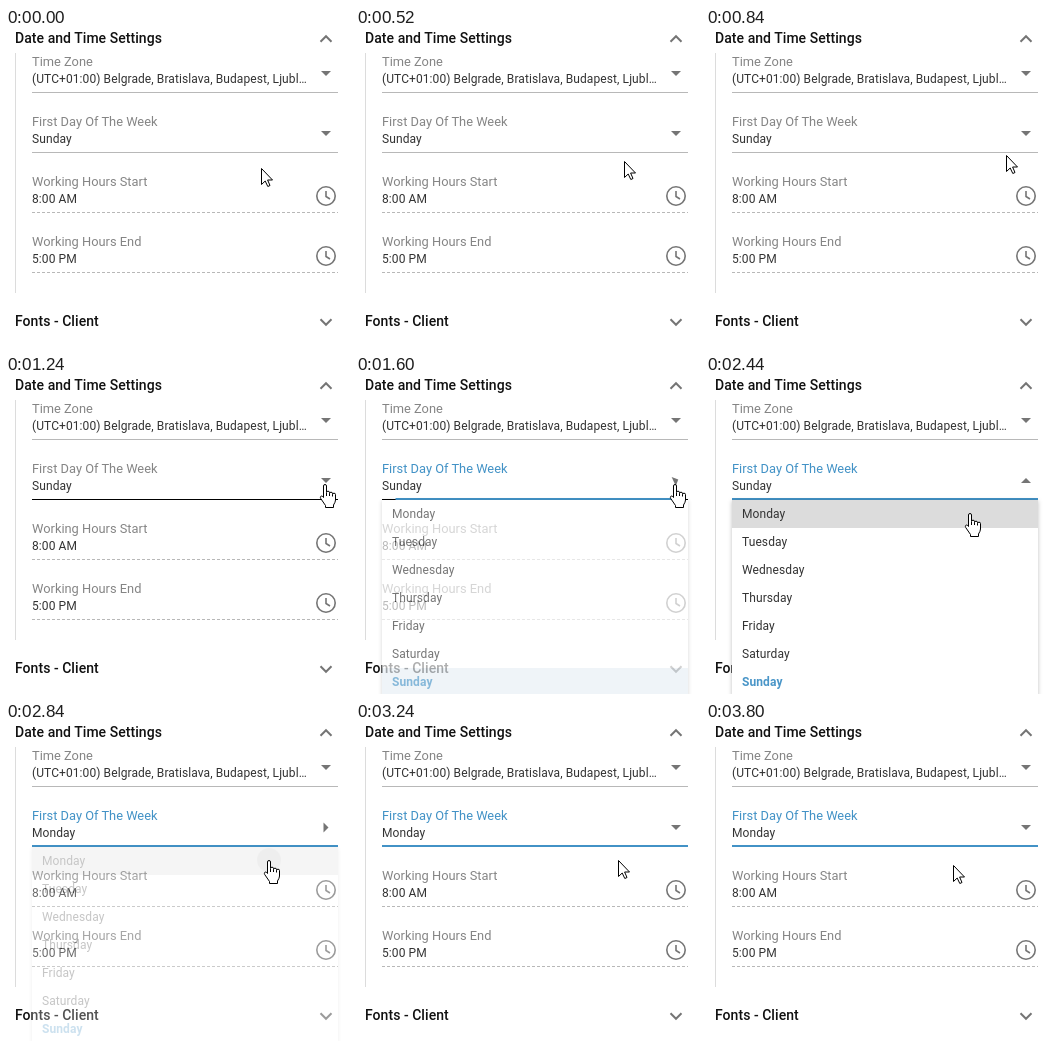
Animation, 344 px wide and 319 px high, one loop 4.2 s. Source, as an HTML page:

```html
<!DOCTYPE html>
<html lang="en">
<head>
<meta charset="utf-8">
<title>Date and Time Settings</title>
<style>
  html, body { margin: 0; width: 100%; height: 100%; overflow: hidden; background: #fff; }
  svg { display: block; width: 344px; height: 319px; font: 12px Roboto, sans-serif; letter-spacing: .09px; fill: #333; }
  .title { font-size: 14px; font-weight: 500; letter-spacing: .05px; fill: #111; }
  .label { font-size: 12.85px; letter-spacing: 0; fill: #858585; }
  .chosen { font-weight: 700; fill: #4a96c8; }
  .caret { fill: #757575; }
  .icon { fill: none; stroke: #757575; stroke-width: 2; }
  .clock { stroke-width: 1.6; }
  .line { fill: none; stroke: #b8b8b8; }
  .dashed { stroke-dasharray: 3 2; }
  .cursor { fill: #fff; stroke: #000; stroke-linejoin: round; }
  #focusLine { fill: #4292c6; }
  #panel { filter: drop-shadow(0 1px 2px rgba(0, 0, 0, .25)); }
</style>
</head>
<body>
<svg id="stage" viewBox="0 0 344 319"></svg>
<script>
const LOOP = 4200, STEP = 40;
const LEFT = 26, WIDTH = 306, ROW = 28, PANEL_TOP = 125;
const days = ['Monday', 'Tuesday', 'Wednesday', 'Thursday', 'Friday', 'Saturday', 'Sunday'];

const text = (x, y, s, attrs = '') => `<text x="${x}" y="${y}" ${attrs}>${s}</text>`;
const caret = (y, id = '') =>
  `<g transform="translate(320 ${y})"><path ${id} class="caret" d="M-5-2.5H5L0 2.5Z"/></g>`;
const chevron = (y, turn) =>
  `<path class="icon" transform="translate(320 ${y}) rotate(${turn})" d="M-5.5 2.75L0-2.75L5.5 2.75"/>`;
const clock = y =>
  `<g class="icon clock" transform="translate(320 ${y})"><circle r="9.2"/><path d="M0-5V.5L4 3"/></g>`;
const row = (id, i, fill) =>
  `<rect id="${id}" x="${LEFT}" y="${PANEL_TOP + ROW * i}" width="${WIDTH}" height="${ROW}" fill="${fill}"/>`;

const field = (y, label, value, style = '', id = '') =>
  text(LEFT, y, label, `class="label" ${id && `id="${id}Label"`}`) +
  text(LEFT, y + 17, value, id && `id="${id}Value"`) +
  `<path class="line ${style}" d="M${LEFT} ${y + 26.5}h${WIDTH}"/>`;

const option = (day, i) =>
  text(36, 143 + ROW * i, day, i === 6 ? 'class="chosen"' : '');

document.getElementById('stage').innerHTML = `
  <defs><clipPath id="firstRow">${row('clip', 0, '#000')}</clipPath></defs>
  <path d="M9.5 25V265" stroke="#dcdcdc"/>
  ${text(9, 15, 'Date and Time Settings', 'class="title"')}${chevron(11, 0)}
  ${field(38, 'Time Zone', '(UTC+01:00) Belgrade, Bratislava, Budapest, Ljubl…')}${caret(45.5)}
  ${field(98, 'First Day Of The Week', 'Sunday', '', 'day')}${caret(105.5, 'id="arrow"')}
  ${field(158, 'Working Hours Start', '8:00 AM', 'dashed')}${clock(168)}
  ${field(218, 'Working Hours End', '5:00 PM', 'dashed')}${clock(228)}
  ${text(9, 298, 'Fonts - Client', 'class="title"')}${chevron(294, 180)}
  <rect id="hoverLine" x="${LEFT}" y="124" width="${WIDTH}" height="1" fill="#000"/>
  <rect id="focusLine" y="123" height="2"/>
  <g id="panel">
    <rect x="${LEFT}" y="${PANEL_TOP}" width="${WIDTH}" height="${ROW * days.length}" fill="#fff"/>
    ${row('hoverRow', 0, '#dcdcdc')}${row('activeRow', 6, '#e8eff5')}
    <circle id="ripple" cx="263" cy="138" clip-path="url(#firstRow)" fill="#000" fill-opacity=".1"/>
    ${days.map(option).join('')}
  </g>
  <path id="pointer" class="cursor" d="M.5 .5V16.5L4.2 13L6.8 18.5L9 17.5L6.6 12H11.5Z"/>
  <path id="hand" class="cursor" d="M-1.5 13.5V2a1.5 1.5 0 0 1 3 0V8.5a1.5 1.3 0 0 1 3 0V9.5a1.5 1.3 0 0 1 3 0V10.5a1.5 1.3 0 0 1 3 0V16q0 2-2 5V23.5H.5V21.5L-4.3 14.5C-5.5 12-3 11-1.5 13.5ZM1.5 9v3M4.5 9.5v2.5M7.5 10.5v2"/>`;

// Cursor stops: time, x, y of the tip.
const path = [
  [400, 255, 140], [720, 290, 122], [840, 300, 127], [960, 308, 127], [1240, 319, 109],
  [1880, 319, 109], [2440, 264, 138], [3400, 262, 138], [3800, 247, 143]
];

const ramp = (t, from, to) => Math.min(1, Math.max(0, (t - from) / (to - from)));
const mix = (a, b, k) => a + (b - a) * k;

function cursorAt(t) {
  const i = Math.max(1, path.findIndex(p => p[0] > t));
  const [a, b] = t >= path.at(-1)[0] ? path.slice(-2) : [path[i - 1], path[i]];
  const k = ramp(t, a[0], b[0]);
  return [1, 2].map(n => Math.round(mix(a[n], b[n], k)));
}

const el = {};
document.querySelectorAll('#stage [id]').forEach(e => el[e.id] = e);
const set = (id, attrs) => {
  for (const k in attrs) el[id].setAttribute(k, attrs[k]);
};
const show = (id, on) => set(id, { visibility: on ? 'visible' : 'hidden' });

function draw(t) {
  const [x, y] = cursorAt(t);
  const overField = t >= 1080 && t < 2880;
  const overRow = overField && t > 1880 && y >= PANEL_TOP;
  for (const id of ['pointer', 'hand']) set(id, { transform: `translate(${x} ${y})` });
  show('pointer', !overField);
  show('hand', overField);

  const tint = ramp(t, 1400, 1560);
  el.dayLabel.style.fill = `rgb(${[66, 146, 198].map(c => mix(133, c, tint))})`;
  el.dayValue.textContent = t < 2720 ? 'Sunday' : 'Monday';
  set('arrow', { transform: `rotate(${-180 * (ramp(t, 1460, 1680) - ramp(t, 2720, 2960))})` });

  const focus = ramp(t, 1480, 1720);
  const width = WIDTH * (1 - .5 * (1 - focus) ** 2.5);
  set('hoverLine', { opacity: ramp(t, 1000, 1200) });
  set('focusLine', { x: LEFT + (WIDTH - width) / 2, width, opacity: Math.min(1, focus * 3) });

  const open = ramp(t, 1480, 1660) - ramp(t, 2760, 2870);
  set('panel', { opacity: open });
  show('panel', open > 0);
  set('hoverRow', { opacity: +(overRow) });
  set('activeRow', { opacity: +(!overRow && t < 2440) });
  set('ripple', { r: 12 * ramp(t, 2520, 2560) });
}

const start = performance.now();
function tick() {
  const t = (performance.now() - start) % LOOP;
  draw(Math.floor(t / STEP) * STEP);
  requestAnimationFrame(tick);
}
tick();
</script>
</body>
</html>
```
